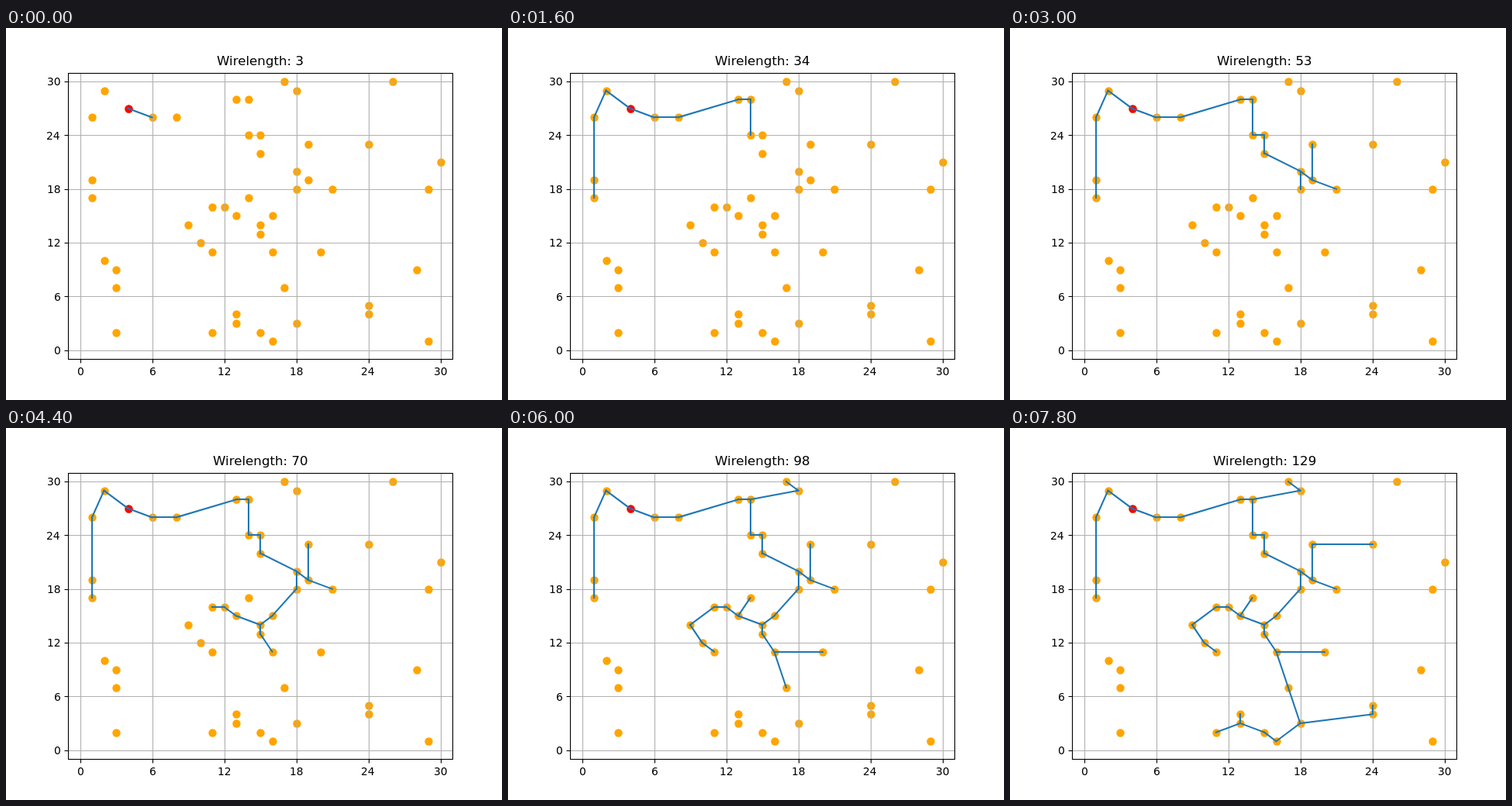
Animation of 640 by 480 pixels, one loop 8000 ms. Source, as an HTML page with a canvas:

```html
<!DOCTYPE html>
<html lang="en">
<head>
<meta charset="utf-8">
<title>Spanning tree growth</title>
<style>
html, body { margin: 0; width: 100%; height: 100%; overflow: hidden; background: #fff; }
canvas { display: block; }
</style>
</head>
<body>
<canvas id="stage" width="640" height="480"></canvas>
<script>
const ctx = document.getElementById('stage').getContext('2d');

const STEP = 200;
const LOOP = 8000;
const AXES = { left: 80.5, right: 576.5, top: 58.5, bottom: 427.5 };

// Terminals by column: x, then each y. Their order settles ties between equal distances.
const points = [
  [30, 21], [29, 18, 1], [28, 9], [26, 30], [24, 23, 5, 4], [21, 18], [20, 11],
  [19, 23, 19], [17, 30, 7], [18, 29, 20, 18, 3], [15, 24, 22, 14, 13, 2],
  [14, 28, 24, 17], [13, 28, 15, 4, 3], [16, 15, 11, 1], [12, 16], [11, 16, 11, 2],
  [10, 12], [9, 14], [8, 26], [6, 26], [1, 26, 19, 17], [2, 29, 10], [3, 9, 7, 2], [4, 27]
].flatMap(([x, ...ys]) => ys.map(y => ({ x, y })));
const root = points[points.length - 1];

const dist = (a, b) => Math.abs(a.x - b.x) + Math.abs(a.y - b.y);

// Prim's algorithm: the last of the closest outside points joins its first closest neighbour.
function growTree(count) {
  const joined = new Set([root]);
  const edges = [];
  while (edges.length < count) {
    const inside = points.filter(p => joined.has(p));
    let best = { length: Infinity };
    for (const to of points) {
      if (joined.has(to)) continue;
      const from = inside.reduce((a, b) => dist(b, to) < dist(a, to) ? b : a);
      const length = dist(from, to);
      if (length <= best.length) best = { from, to, length };
    }
    joined.add(best.to);
    edges.push(best);
  }
  return edges;
}
const edges = growTree(LOOP / STEP);

const px = x => 95.5 + 15.5 * x;
const py = y => 415.65 - 11.55 * y;
const snap = v => Math.floor(v + 0.5);
const mid = v => snap(v) + 0.5;

function pen(color, width, cap) {
  ctx.strokeStyle = color;
  ctx.lineWidth = width;
  ctx.lineCap = cap;
}

function line(x1, y1, x2, y2) {
  ctx.beginPath();
  ctx.moveTo(x1, y1);
  ctx.lineTo(x2, y2);
  ctx.stroke();
}

function dot({ x, y }, color) {
  ctx.fillStyle = color;
  ctx.beginPath();
  ctx.arc(mid(px(x)), mid(py(y)), 5.2, 0, 2 * Math.PI);
  ctx.fill();
}

// Places the inked width of the text: anchor 0.5 centres it on x, 1 ends it at x.
function text(str, x, y, size, anchor) {
  ctx.font = size + 'px "DejaVu Sans", sans-serif';
  ctx.fillStyle = '#000';
  const m = ctx.measureText(str);
  const width = m.actualBoundingBoxLeft + m.actualBoundingBoxRight;
  ctx.fillText(str, snap(x - width * anchor) + m.actualBoundingBoxLeft, y);
}

function eachTick(fn) {
  for (let t = 0; t <= 30; t += 6) fn(t, mid(px(t)), mid(py(t)));
}

function drawGrid() {
  pen('#b0b0b0', 1.11, 'butt');
  eachTick((t, x, y) => {
    line(x, AXES.top, x, AXES.bottom);
    line(AXES.left, y, AXES.right, y);
  });
}

function drawEdge({ from, to }) {
  // Upright and level edges sit on whole pixels.
  const fit = from.x === to.x || from.y === to.y ? snap : v => v;
  line(fit(px(from.x)), fit(py(from.y)), fit(px(to.x)), fit(py(to.y)));
}

function drawFrame() {
  pen('#000', 1.11, 'butt');
  eachTick((t, x, y) => {
    line(x, AXES.bottom, x, AXES.bottom + 5);
    line(AXES.left, y, AXES.left - 5, y);
    text(t, px(t), 448, 13.89, 0.5);
    text(t, 70.3, Math.round(py(t) + 5.3), 13.89, 1);
  });
  ctx.strokeRect(AXES.left, AXES.top, AXES.right - AXES.left, AXES.bottom - AXES.top);
}

function draw(count) {
  ctx.fillStyle = '#fff';
  ctx.fillRect(0, 0, 640, 480);
  for (const p of points) dot(p, '#ffa500');
  dot(root, '#f00');
  drawGrid();

  const shown = edges.slice(0, count);
  pen('#1f77b4', 2.08, 'square');
  shown.forEach(drawEdge);

  drawFrame();
  const total = shown.reduce((sum, e) => sum + e.length, 0);
  text('Wirelength: ' + total, 328, 48, 16.67, 0.5);
}

const start = performance.now();
function tick() {
  const t = Math.max(0, performance.now() - start) % LOOP;
  draw(Math.floor(t / STEP) + 1);
  requestAnimationFrame(tick);
}
tick();
</script>
</body>
</html>
```
